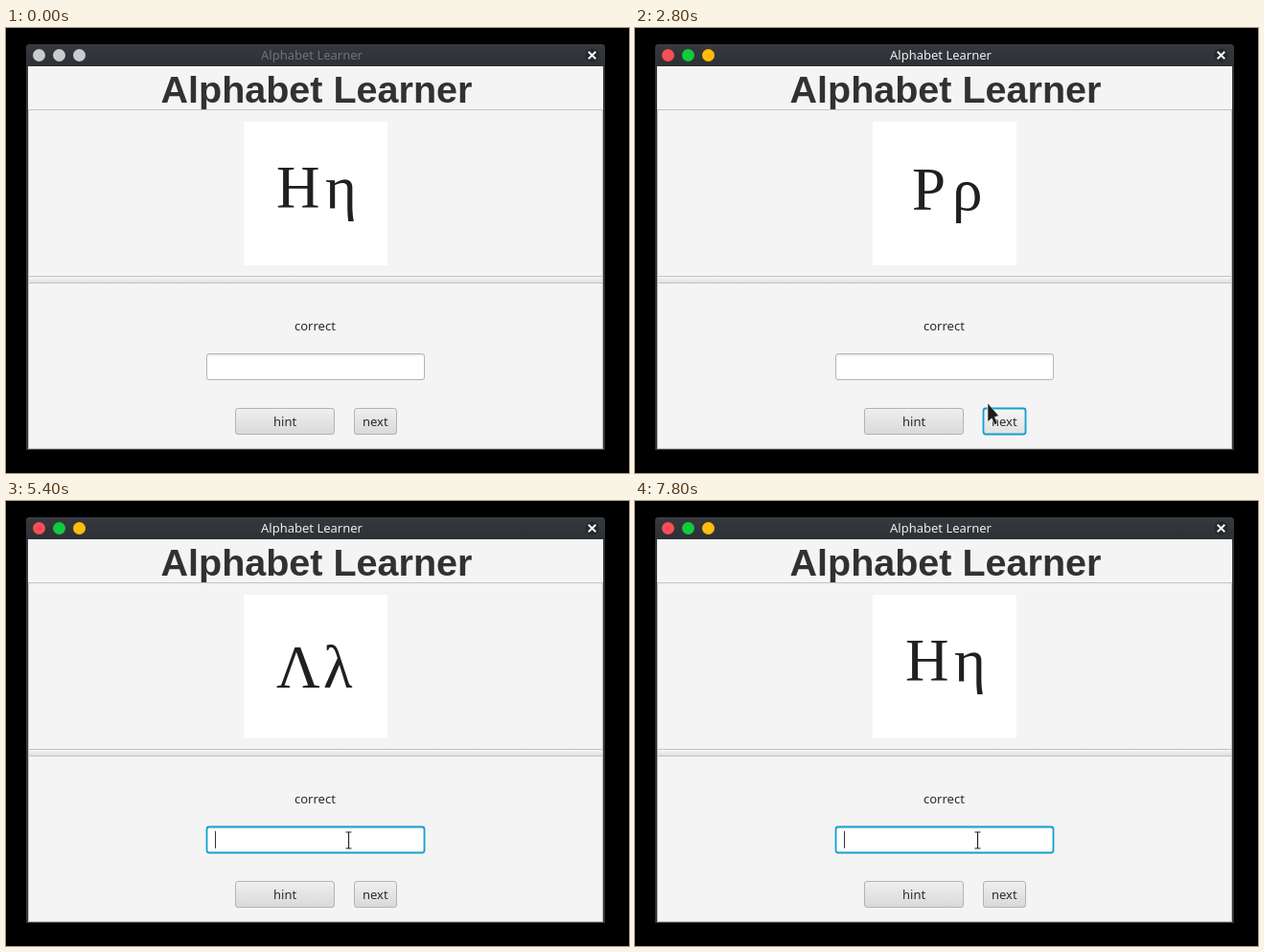
Write an HTML page that moves like this. It is 650 by 465 pixels and loops after 8 s.

```html
<!DOCTYPE html>
<html lang="en">
<head>
<meta charset="utf-8">
<title>Alphabet Learner</title>
<style>
  html, body { margin: 0; width: 100%; height: 100%; overflow: hidden; background: #000; }
  svg { display: block; width: 650px; height: 465px; }
  text { font: 13px "Noto Sans", "Open Sans", sans-serif; fill: #2b2b2b; white-space: pre; }
  .heading { font: bold 39.5px "Liberation Sans", Arial, sans-serif; fill: #313131; }
  .glyph { font: 63px "Liberation Serif", "Times New Roman", serif; fill: #202020; }
  .line { fill: #c3c3c3; }
</style>
</head>
<body>
<svg viewBox="0 0 650 465">
  <defs>
    <linearGradient id="bar" x2="0" y2="1"><stop stop-color="#3a3e44"/><stop offset=".15" stop-color="#34383d"/><stop offset="1" stop-color="#2d3136"/></linearGradient>
    <linearGradient id="plain" x2="0" y2="1"><stop stop-color="#efefef"/><stop offset="1" stop-color="#d9d9d9"/></linearGradient>
    <linearGradient id="hover" x2="0" y2="1"><stop stop-color="#f7f7f7"/><stop offset="1" stop-color="#e1e1e1"/></linearGradient>
    <linearGradient id="pressed" x2="0" y2="1"><stop stop-color="#d6d6d6"/><stop offset="1" stop-color="#c5c5c5"/></linearGradient>
    <linearGradient id="inset" x2="0" y2="1"><stop stop-color="#e6e6e6"/><stop offset=".14" stop-color="#fff"/></linearGradient>
    <linearGradient id="divider" x2="0" y2="1"><stop stop-color="#f6f6f6"/><stop offset="1" stop-color="#e0e0e0"/></linearGradient>
  </defs>

  <rect width="650" height="465"/>
  <path d="M21 441V21q0-4 4-4H621q4 0 4 4V441Z" fill="#33373c"/>
  <path d="M21 40V21q0-4 4-4H621q4 0 4 4V40Z" fill="url(#bar)"/>
  <g id="dots">
    <circle cx="34.5" cy="28.5" r="6.5"/>
    <circle cx="55.5" cy="28.5" r="6.5"/>
    <circle cx="76.5" cy="28.5" r="6.5"/>
  </g>
  <text id="caption" x="266" y="33">Alphabet Learner</text>
  <circle cx="611.5" cy="28.5" r="7" fill="#24282c"/>
  <path d="M607.7 24.7l7.6 7.6m0-7.6l-7.6 7.6" stroke="#f4f4f4" stroke-width="2"/>

  <rect x="23" y="40" width="600" height="399" fill="#f4f4f4"/>
  <text class="heading" x="161.5" y="78">Alphabet Learner</text>
  <path class="line" fill-rule="evenodd" d="M23 85H623V440H23ZM24 86V439H622V86Z"/>
  <rect class="line" x="23" y="259" width="600" height="8"/>
  <rect x="24" y="260" width="598" height="6" fill="url(#divider)"/>

  <rect x="248" y="98" width="150" height="150" fill="#fff"/>
  <text class="glyph" id="upper"></text>
  <text class="glyph" id="lower"></text>

  <text x="301" y="316">correct</text>
  <rect id="field" x="209.5" y="340.5" width="227" height="27" rx="2.5" fill="url(#inset)"/>
  <text id="typed" x="218" y="359"></text>
  <rect id="caret" y="345" width="1" height="18" fill="#333"/>

  <rect x="239.5" y="397.5" width="103" height="27" rx="2.5" fill="url(#plain)" stroke="#b3b3b3"/>
  <text x="279" y="416">hint</text>
  <rect id="next" x="363.5" y="397.5" width="44" height="27" rx="2.5"/>
  <text x="372" y="416">next</text>

  <path id="arrow" d="M0 0V19.5L4.2 15.8L7.2 22.5L10.2 21.2L7.4 14.6L11.5 13.2Z" fill="#1d1d1d" stroke="#f4f4f4" stroke-opacity=".7" stroke-width=".8"/>
  <g id="beam" fill="none">
    <path d="M-3-8.5H3M0-8.5V8.5M-3 8.5H3" stroke="#fff" stroke-opacity=".7" stroke-width="2.4"/>
    <path d="M-3-8.5H3M0-8.5V8.5M-3 8.5H3" stroke="#222" stroke-width="1.2"/>
  </g>
</svg>
<script>
const LOOP = 8000, STEP = 100;
const $ = id => document.getElementById(id);
const set = (id, attrs) => {
  for (const name in attrs) $(id).setAttribute(name, attrs[name]);
};
const show = (id, on) => set(id, { visibility: on ? 'visible' : 'hidden' });
const within = (t, from, to) => t >= from && t < to;

// Letter pairs: upper, its x, lower, its x, baseline
const eta = ['Η', 282, 'η', 333, 188];
const theta = ['Θ', 279, 'θ', 331, 195];
const omega = ['Ω', 267, 'ω', 326, 195];
const rho = ['Ρ', 289, 'ρ', 331, 190];
const lambda = ['Λ', 282, 'λ', 331, 195];

const letters = [[0, eta], [1400, theta], [2200, omega], [2500, rho], [4300, lambda], [7800, eta]];
const typing = [[0, ''], [6200, 'L'], [6500, 'La'], [6800, 'Lam'], [7300, 'Lambd'], [7400, 'Lambda'], [7800, '']];
const presses = [[1300, 1400], [2000, 2300], [4100, 4300]];

// Pointer path: time, x, y
const path = [
  [400, 369, 457], [600, 378, 424], [800, 385, 403], [1500, 385, 403],
  [1600, 388, 403], [1800, 388, 403], [1900, 388, 400], [2700, 388, 400],
  [2800, 368, 392], [2900, 350, 383], [3100, 334, 378], [3300, 352, 391],
  [3500, 378, 405], [3600, 378, 405], [3700, 375, 405], [4300, 375, 405],
  [4500, 370, 401], [4700, 360, 391], [4800, 358, 380], [4900, 357.5, 362.5],
  [5000, 357.5, 362.5], [5100, 357.5, 354.5]
];

const latest = (list, t) => list.filter(([at]) => at <= t).pop()[1];

function pointerAt(t) {
  const i = path.findIndex(([at]) => at > t);
  if (i < 0) return path[path.length - 1].slice(1);
  if (i === 0) return [0, 500];
  const [t0, x0, y0] = path[i - 1], [t1, x1, y1] = path[i];
  const k = (t - t0) / (t1 - t0);
  return [x0 + (x1 - x0) * k, y0 + (y1 - y0) * k];
}

function drawWindow(active) {
  const colors = active ? ['#fb4d55', '#10cc3c', '#ffbd08'] : ['#c9cbce', '#c9cbce', '#c9cbce'];
  [...$('dots').children].forEach((dot, i) => dot.setAttribute('fill', colors[i]));
  $('caption').style.fill = active ? '#eceded' : '#6f7479';
}

function drawLetters([upper, ux, lower, lx, y]) {
  $('upper').textContent = upper;
  $('lower').textContent = lower;
  set('upper', { x: ux, y });
  set('lower', { x: lx, y });
}

function outline(id, focused) {
  set(id, {
    stroke: focused ? '#139fd0' : '#b3b3b3',
    'stroke-width': focused ? 1.8 : 1
  });
}

function drawField(t, focused) {
  outline('field', focused);
  $('typed').textContent = latest(typing, t);
  set('caret', { x: Math.round(217.6 + $('typed').getComputedTextLength()) });
  show('caret', focused && !within(t, 5800, 6200));
}

function drawNext(t, active, focused, x, y) {
  const over = active && x > 363 && x < 408 && y > 397 && y < 425;
  const down = presses.some(([from, to]) => within(t, from, to));
  outline('next', focused);
  set('next', { fill: `url(#${down ? 'pressed' : over || focused ? 'hover' : 'plain'})` });
}

function render(time) {
  const t = Math.floor(time % LOOP / STEP) * STEP;
  const active = t >= 1300, inField = t >= 5400, beam = t >= 4900;
  const [x, y] = pointerAt(t);
  drawWindow(active);
  drawLetters(latest(letters, t));
  drawField(t, inField);
  drawNext(t, active, active && !inField, x, y);
  show('arrow', t >= 400 && !beam);
  show('beam', beam);
  set(beam ? 'beam' : 'arrow', { transform: `translate(${x} ${y})` });
}

const start = performance.now();
function tick() {
  render(performance.now() - start);
  requestAnimationFrame(tick);
}
tick();
</script>
</body>
</html>
```
